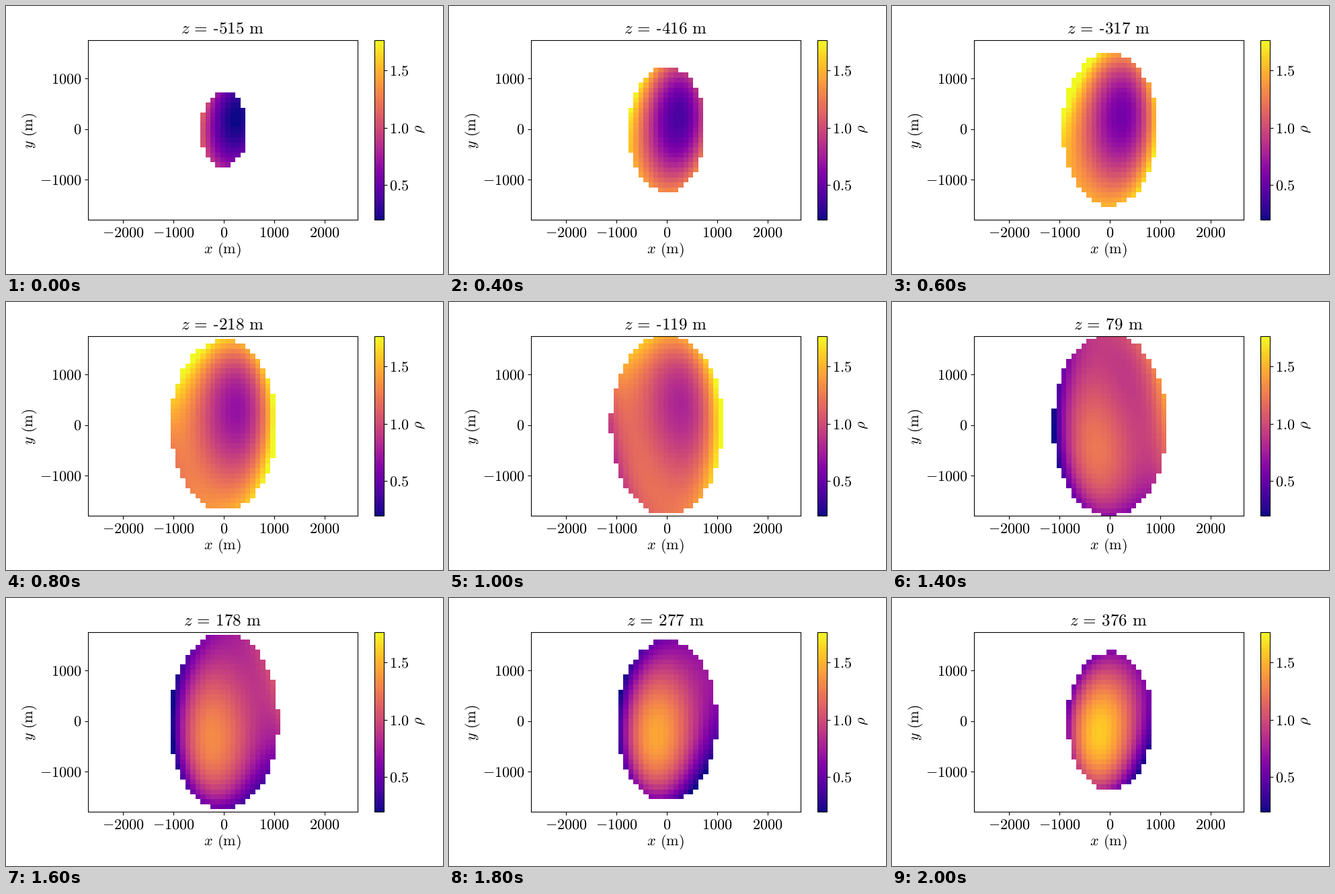
Animation of 650 by 400 pixels, one loop 2200 ms. Source, as a matplotlib script:

```python
import numpy as np
import matplotlib.pyplot as plt
from matplotlib.animation import FuncAnimation
from matplotlib.ticker import FuncFormatter

WIDTH, HEIGHT, DPI = 650, 400, 100
STEP, OFFSET = 99, -20           # grid spacing and origin shift, metres
SEMI_AXES = 1141, 1842, 563.7    # ellipsoid, metres
RHO_MIN, RHO_MAX = 0.197, 1.763
GAP = r"\hspace{0.38}"           # a text-width space

plt.rcParams["mathtext.fontset"] = "cm"
plt.rcParams["text.hinting"] = "none"

xs = OFFSET + STEP * np.arange(-27, 28)
ys = OFFSET + STEP * np.arange(-18, 19)
X, Y = np.meshgrid(xs, ys)


def density(z):
    """Cubic density field on one slice, masked outside the ellipsoid."""
    a, b, c = SEMI_AXES
    outside = (X / a) ** 2 + (Y / b) ** 2 + (z / c) ** 2 > 1
    x, y, h = X / 1000, Y / 1000, z / 1000
    level = 0.535 + 0.72 * h + 0.6 * h**3
    level = level + (-0.24 + 0.08 * h - 1.3 * h**2) * x - 2.4 * h * x**2 + 0.455 * x**3
    level = level - 0.11 * y - 0.76 * h * y**2 + 0.05 * y**3
    level = level + 0.08 * x * y**2 + 0.18 * x**2 * y + 0.6 * x * y * h
    rho = RHO_MIN + (RHO_MAX - RHO_MIN) * np.clip(level, 0, 1)
    return np.ma.masked_where(outside, rho)


def pixel_axes(left, top, right, bottom):
    return fig.add_axes([left / WIDTH, 1 - bottom / HEIGHT,
                         (right - left) / WIDTH, (bottom - top) / HEIGHT])


def label(x, baseline, text, size=16, rotation=0):
    return fig.text(x / WIDTH, 1 - baseline / HEIGHT, text, size=size,
                    rotation=rotation, rotation_mode="anchor",
                    ha="center", va="baseline")


def roman(digits):
    return FuncFormatter(lambda v, _: rf"$\mathrm{{{v:.{digits}f}}}$")


def title_text(z):
    sign = "\u2010" if z < 0 else ""
    equals = r"\hspace{0.18}=\hspace{0.18}"
    return rf"$z{equals}\mathrm{{{sign}{abs(z)}}}{GAP}\mathrm{{m}}$"


fig = plt.figure(figsize=(WIDTH / DPI, HEIGHT / DPI), dpi=DPI, facecolor="white")

ax = pixel_axes(122.1, 51.1, 523.1, 319.1)
mesh = ax.pcolormesh(xs, ys, density(-515), shading="nearest", cmap="plasma",
                     vmin=RHO_MIN, vmax=RHO_MAX)
ax.set(xlim=(xs[0], xs[-1]), ylim=(ys[0], ys[-1]),
       xticks=range(-2000, 2001, 1000), yticks=(-1000, 0, 1000))
ax.xaxis.set_major_formatter(roman(0))
ax.yaxis.set_major_formatter(roman(0))
ax.tick_params(labelsize=16)

cax = pixel_axes(548.1, 51.1, 562.1, 319.1)
bar = fig.colorbar(mesh, cax=cax, ticks=(0.5, 1.0, 1.5), format=roman(1))
bar.ax.tick_params(labelsize=16, pad=2)

title = label(322, 41.4, title_text(-515), size=18)
label(321.5, 370, rf"$x{GAP}\mathrm{{(m)}}$")
label(41.5, 186, rf"$y{GAP}\mathrm{{(m)}}$", rotation=90)
label(619.5, 183.5, r"$\rho$", rotation=90)


def update(frame):
    # The lowest slice is held for two frames.
    z = OFFSET + STEP * (max(frame - 1, 0) - 5)
    mesh.set_array(density(z))
    title.set_text(title_text(z))
    return mesh, title


anim = FuncAnimation(fig, update, frames=11, interval=200, repeat=True, repeat_delay=0)
plt.show()
```
